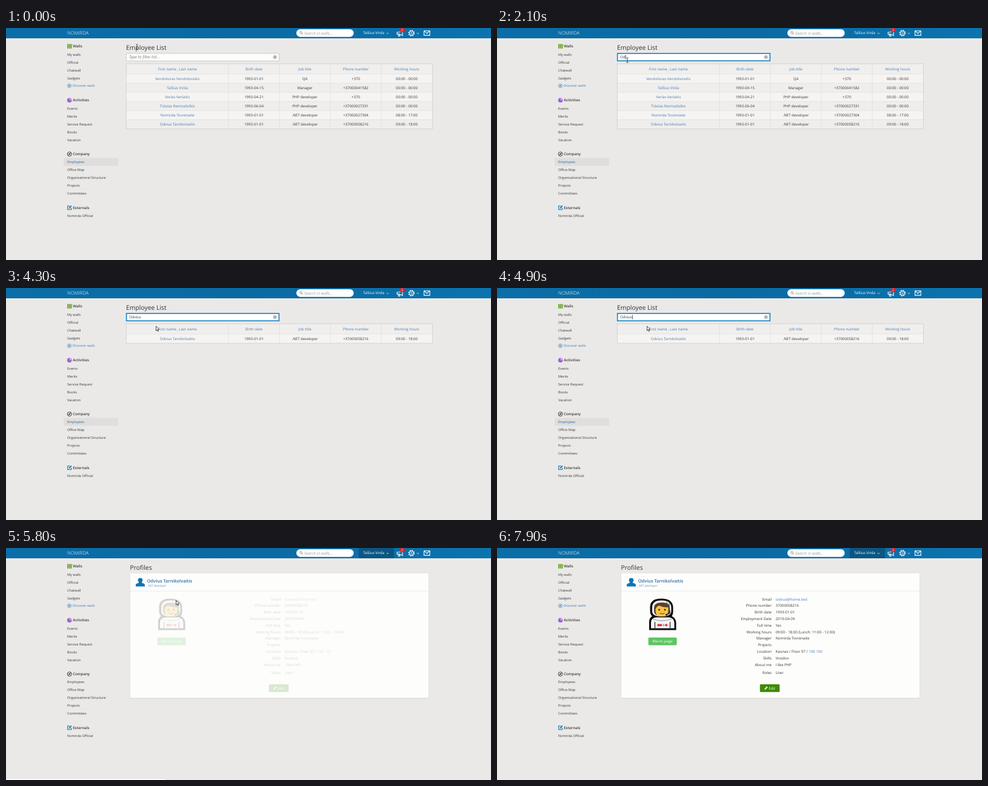
An HTML page for the animation above (8000 ms loop, 800x383 px).

```html
<!DOCTYPE html>
<html lang="en">
<head>
<meta charset="utf-8">
<title>Employee list</title>
<style>
html, body { margin: 0; width: 100%; height: 100%; overflow: hidden; background: #eae9e7; }
svg { display: block; width: 100%; height: 100%; }
text { font-family: "Open Sans", sans-serif; text-rendering: geometricPrecision; white-space: pre; }
.hot .row { fill: #cfecfc; }
.over .name { text-decoration: underline; fill: #2a6496; }
</style>
</head>
<body>
<svg id="stage" viewBox="0 0 800 383" xmlns="http://www.w3.org/2000/svg"></svg>
<script>
const LOOP = 8000;
const INK = '#3a3a3a', LINK = '#4a7db3', BLUE = '#0f76b2';
const OWNER = 'Talšius Virda', PERSON = 'Odvius Tarnikolvaitis', QUERY = 'Odvius';

const text = (x, y, s, size = 6.08, fill = INK, more = '') =>
  `<text x="${x}" y="${y}" font-size="${size}" fill="${fill}" ${more}>${s}</text>`;
const mid = (x, y, s, fill, more = '') => text(x, y, s, 6.08, fill, 'text-anchor="middle" ' + more);
const box = (x, y, w, h, fill, more = '') =>
  `<rect x="${x}" y="${y}" width="${w}" height="${h}" fill="${fill}" ${more}/>`;
const disc = (x, y, r, fill, more = '') => `<circle cx="${x}" cy="${y}" r="${r}" fill="${fill}" ${more}/>`;
const path = (d, fill = 'none', more = '') => `<path d="${d}" fill="${fill}" ${more}/>`;
const line = (d, color, w = 1, more = '') => path(d, 'none', `stroke="${color}" stroke-width="${w}" ${more}`);
const group = (id, body, more = '') => `<g id="${id}" ${more}>${body}</g>`;

function topBar() {
  const chevron = x => line(`M${x} 8l1.7 1.7 1.7-1.7`, '#fff', .8);
  return box(0, 0, 800, 17, 'url(#bar)') +
    text(101, 10.8, 'NOMIRDA', 7.9, '#fff', 'font-weight="300"') +
    box(479, 2, 94.5, 12.7, '#fff', 'rx="6.3"') +
    disc(486.5, 7.6, 1.8, 'none', 'stroke="#777" stroke-width=".8"') + line('M487.9 9l1.7 1.8', '#777', .9) +
    text(492, 10.6, 'Search in walls...', 6.4, '#999', 'font-style="italic"') +
    box(581.5, 0, .6, 17, '#0b6093') +
    group('owner', box(582, 0, 58, 17, '#0b5683')) +
    text(589, 10.4, OWNER, 6.05, '#fff') + chevron(627.8) +
    path('M645 7l4-.2 5-2.8v8.5l-5-2.4-4-.2zM646.5 10.4h2.2l1 3h-2z', 'none', 'stroke="#fff" stroke-width="1.1"') +
    `<ellipse cx="653.5" cy="3.5" rx="4.6" ry="3.4" fill="#d9232e"/>` +
    text(653.5, 5.4, '2', 5, '#fff', 'text-anchor="middle"') +
    disc(668.8, 8.5, 4.5, 'none', 'stroke="#fff" stroke-width="1.6" stroke-dasharray="1.9 1.634"') +
    disc(668.8, 8.5, 3.5, 'none', 'stroke="#fff"') + disc(668.8, 8.5, 1.3, 'none', 'stroke="#fff" stroke-width=".8"') +
    chevron(677.6) +
    line('M689.5 4.7h9.6v7.4h-9.6zl4.8 4.2 4.8-4.2', '#fff', 1.1);
}

function menuIcons() {
  let s = '';
  for (let i = 0; i < 9; i++) s += box(101 + i % 3 * 2.7, 26.6 + (i / 3 | 0) * 2.5, 2.2, 2, '#5a9a12');
  return s +
    disc(104.5, 95.4, 3, 'none', `stroke="${LINK}" stroke-width=".8"`) + disc(104.5, 95.4, 1.3, '#3b9bd0') +
    disc(104.7, 119.2, 3.8, '#9a62cc') + path('M104.7 119.2v-3.8a3.8 3.8 0 0 1 3.8 3.8z', '#c9a5e6') +
    disc(104.7, 208.1, 3.5, 'none', `stroke="${INK}"`) + path('M106.8 206l-1.3 3-2.9 1.2 1.3-3z', INK) +
    line('M105.7 293.7h-4v6h6v-2.8', BLUE, 1.1) + line('M104 297.6l4-4', BLUE, 1.8);
}

function sideMenu() {
  const sections = [
    [30, 'Walls', 43.5, ['My walls', 'Official', 'Chatwall', 'Gadgets', '']],
    [119.2, 'Activities', 132.5, ['Events', 'Merits', 'Service Request', 'Books', 'Vacation']],
    [208, 'Company', 221, ['', 'Office Map', 'Organizational Structure', 'Projects', 'Committees']],
    [296.6, 'Externals', 309.6, ['Nomirda Official']]
  ];
  return sections.map(([y, head, top, items]) =>
    text(110.2, y + 2.2, head, 6.1, INK, 'font-weight="600"') +
    items.map((s, i) => text(101, top + i * 13 + 2, s, 5.6)).join('')
  ).join('') +
    text(110, 97.4, 'Discover walls', 5.6, LINK) +
    group('here', box(95, 214.5, 90, 13, '#dfdedc') + text(101, 223, 'Employees', 5.6, '#2168ad', 'font-weight="500"')) +
    group('away', text(101, 223, 'Employees', 5.6));
}

const CENTERS = [282.7, 409, 493, 577, 661];
const PEOPLE = [
  ['Vendolioras Vendolioraitis', '1993-01-01', 'QA', '+370', '00:00 - 00:00'],
  [OWNER, '1993-04-15', 'Manager', '+37000041582', '00:00 - 00:00'],
  ['Verlas Verlaitis', '1993-04-21', 'PHP developer', '+370', '00:00 - 00:00'],
  ['Tidulas Remnašolkis', '1993-06-04', 'PHP developer', '+37000027331', '00:00 - 00:00'],
  ['Nomirda Tovrenaite', '1993-01-01', '.NET developer', '+37000027304', '08:00 - 17:00'],
  [PERSON, '1993-01-01', '.NET developer', '+37000058216', '09:00 - 18:00']
];

function table(people) {
  const rowH = 15.1, h = 17 + people.length * rowH;
  const heads = ['First name , Last name', 'Birth date', 'Job title', 'Phone number', 'Working hours'];
  let s = box(198, 59, 505.5, 17, '#f0efed') + heads.map((t, i) => mid(CENTERS[i], 69.7, t, LINK)).join('');
  people.forEach((cells, r) => {
    const y = 76 + r * rowH;
    s += box(198, y, 505.5, rowH, r % 2 ? '#efeeec' : '#f5f4f2', 'class="row"') +
      line(`M198 ${y}h505.5`, '#dddcda', .6) +
      cells.map((t, i) => mid(CENTERS[i], y + 9.7, t, i ? INK : LINK, i ? '' : 'class="name"')).join('');
  });
  for (const x of [367, 451, 535, 619]) s += line(`M${x} 59v${h}`, '#dddcda', .7);
  return s + box(198.3, 59, 505.2, h, 'none', 'stroke="#cfcecc" stroke-width=".8"');
}

function listPage() {
  return text(198, 35.6, 'Employee List', 10.4, '#333') +
    box(198.4, 42, 252.2, 12.2, '#fdfdfc', 'stroke="#c4c3c1" stroke-width=".8"') +
    group('focus', box(198.7, 42, 251.6, 12.2, '#fff', 'stroke="#2089c2" stroke-width="1.7"')) +
    text(203, 50.4, '', 6.08, INK, 'id="typed"') +
    group('hint', text(203, 50.4, 'Type to filter list...', 6.5, '#777', 'font-style="italic"')) +
    box(0, 44.6, .7, 7, '#111', 'id="caret"') +
    disc(443.6, 48, 2.7, '#c6c6c6', 'stroke="#999" stroke-width=".6"') + line('M442.2 48h2.8', '#777', .8) +
    group('everyone', table(PEOPLE)) + group('match', table(PEOPLE.slice(-1)));
}

function avatar() {
  return path('M251 135.5v-14q0-6 5-9-3.500-3-3.500-8v-7q0-14 18-14 20 0 20 15v7q0 4-2 7 7 4 7 11v12z', '#0b0b0b') +
    path('M254 132.500v-9q0-8 8-9h22q8 1 8.500 9v9z', '#f4f4f4') +
    path('M256 98q0-11.500 15.500-11.500T287.500 98v6q0 9-16 9t-15.500-9z', '#f1f1f1') +
    path('M259 99q0-9 13-9t13 9v5q0 8-13 8t-13-8z', '#5b4030') +
    path('M261.500 101q1-4 6-6 5 3 15 3v6q0 9-10.500 9t-10.500-9z', '#f6c443') +
    disc(267.5, 102, 1.4, '#26211c') + disc(277, 102, 1.4, '#26211c') +
    line('M268.500 107.500q4 2.500 8 0', '#8a4c20', 1.2) +
    line('M285 103v4.500l-5 2.500', '#222', 1.4) + disc(279.5, 110.2, 1.5, '#222') +
    line('M257 117.500q15 5 31 0', '#b9bfc4', 1.8) +
    line('M260.500 122v10.500M285.500 122v10.500', '#222', 1.2) +
    box(264.5, 125.5, 7.5, 3.6, '#e0353b') + box(273.2, 125.5, 3, 3.6, '#a7adb2') + box(277.4, 125.5, 3.6, 3.6, '#e0353b');
}

function profilePage() {
  const fields = [
    ['Email', `<tspan fill="${LINK}">odvius@home.test</tspan>`], ['Phone number', '37000058216'],
    ['Birth date', '1993-01-01'], ['Employment Date', '2019-04-09'], ['Full time', 'Yes'],
    ['Working hours', '09:00 - 18:00 (Lunch: 11:00 - 12:00)'], ['Manager', 'Nomirda Tovrenaite'],
    ['Projects', ''], ['Location', `Kaunas / Floor 97 / <tspan fill="${LINK}">100 100</tspan>`],
    ['Skills', 'Voodoo'], ['About me', 'I like PHP'], ['Roles', 'User']
  ];
  const rows = fields.map(([label, value], i) => {
    const y = 86.6 + i * 10.8 + (i === 11 ? 2.2 : 0);
    return text(453, y, label, 6.08, INK, 'text-anchor="end"') + text(459.5, y, value);
  }).join('');
  return text(204.5, 35.6, 'Profiles', 10.4, '#333') +
    box(204.6, 42.4, 492.8, 206.2, '#d6d5d3') + box(205, 42, 492, 205.6, '#fdfdfb') +
    line('M205 71h492', '#e3e6e8', .8) +
    path('M214 63.500v-2.500q0-2 5-3.400v-1.300q-1.400-1.500-1.400-3.300 0-3.500 3.900-3.500t3.900 3.500q0 1.800-1.400 3.300v1.300q5 1.400 5 3.400v2.500z', BLUE) +
    text(232.7, 56.5, PERSON, 7.45, '#2f6dab', 'font-weight="600"') +
    text(233, 63.8, '.NET developer', 4.85, '#6f93b8', 'font-style="italic"') +
    group('details', avatar() +
      box(249.7, 147.7, 46.8, 12.8, '#5bc560', 'rx="1.6"') + mid(273, 156.2, 'Merits page', '#fff') +
      rows +
      box(433.7, 225, 32.5, 12.8, '#3d8a05', 'rx="1.6"') +
      path('M441 234l.6-2 3.400-3.400 1.500 1.500-3.500 3.400z', '#fff') + text(448.2, 233.5, 'Edit', 6.08, '#fff'));
}

const cursors =
  group('beam', line('M-1.600-4h1.200l.4.500.4-.5h1.200M0-3.500v7M-1.600 4h1.200l.4-.5.4.5h1.200', '#222', .8)) +
  group('arrow', path('M0 0v7.400l1.700-1.500 1.200 2.700 1.200-.5-1.200-2.600h2.300z', '#fff', 'stroke="#222" stroke-width=".8"')) +
  group('hand', path('M-.8.8q.8-1.200 1.600 0v3l3 .8q.9.300.8 1.400l-.6 3.800h-4.200l-2.600-3.700q.2-1 1.300-.4l.7.6z', '#fff', 'stroke="#222" stroke-width=".8"'));

stage.innerHTML =
  `<defs><linearGradient id="bar"><stop stop-color="#0b6ea8"/><stop offset=".5" stop-color="#0a6aa3"/><stop offset="1" stop-color="#0b73ae"/></linearGradient></defs>` +
  topBar() + menuIcons() + sideMenu() + group('list', listPage()) + group('profile', profilePage()) +
  group('status', box(0, 380.6, 264, 3, '#fbfbfa', 'stroke="#d5d4d2" stroke-width=".5"')) +
  group('pointer', cursors);

const $ = id => document.getElementById(id);
const show = (id, on) => { $(id).style.display = on ? '' : 'none'; };
const clamp = v => Math.max(0, Math.min(1, v));

// time, x, y of the pointer's hot spot
const ROUTE = [
  [0, 216, 31], [500, 216, 31], [1000, 215, 53], [3500, 215, 53],
  [4100, 247.5, 63], [5350, 247.5, 63], [5600, 280.5, 86.5], [LOOP, 280.5, 86.5]
];
function pointerAt(t) {
  const i = ROUTE.findIndex(k => k[0] > t);
  const [t0, x0, y0] = ROUTE[i - 1], [t1, x1, y1] = ROUTE[i];
  const u = (t - t0) / (t1 - t0), e = u * u * (3 - 2 * u);
  return [x0 + (x1 - x0) * e, y0 + (y1 - y0) * e];
}

const KEYS = [1880, 2050, 2250, 2400, 2550, 2700];

function draw(t) {
  const onProfile = t >= 5790, found = t >= 3050, focused = t >= 1300 && t < 5640;
  const [x, y] = pointerAt(t);
  const overLink = t > 5550 && !onProfile;

  show('list', !onProfile);
  show('profile', onProfile);
  show('here', !onProfile);
  show('away', onProfile);
  show('owner', onProfile);
  $('details').setAttribute('opacity', clamp((t - 5730) / 400));

  const count = KEYS.filter(k => k <= t).length;
  $('typed').textContent = QUERY.slice(0, count);
  show('hint', !count);
  show('focus', focused);
  show('caret', focused && (t < 2700 || (t - 2700) % 1060 < 530));
  $('caret').setAttribute('x', 203.3 + (count && !onProfile ? $('typed').getComputedTextLength() : 0));

  show('everyone', !found);
  show('match', found);
  $('match').setAttribute('class', (y > 76 ? 'hot ' : '') + (overLink ? 'over' : ''));
  show('status', t > 5570 && t < 5950);

  $('pointer').setAttribute('transform', `translate(${x} ${y})`);
  show('beam', t < 3650);
  show('hand', overLink);
  show('arrow', t >= 3650 && !overLink);
}

function tick() {
  draw(performance.now() % LOOP);
  requestAnimationFrame(tick);
}
tick();
</script>
</body>
</html>
```
